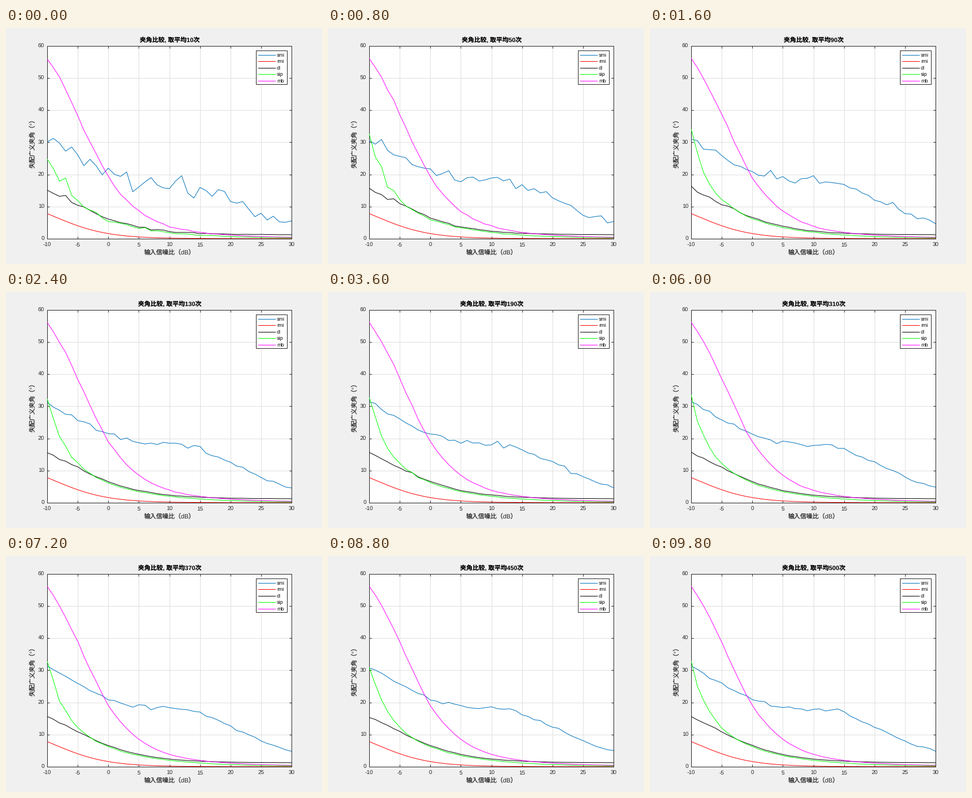
These frames come from a looping animation (560 by 420 pixels, 10000 ms). A matplotlib script:

```python
import numpy as np
import matplotlib.pyplot as plt
from matplotlib.animation import FuncAnimation
from matplotlib.patches import Rectangle

W, H, DPI = 560, 420, 100
PX = 72 / DPI                       # one pixel in points
LEFT, BOTTOM, AX_W, AX_H = 73.1, 45.1, 433, 343
INK = "#262626"
plt.rcParams.update({
    "font.family": ["Liberation Sans", "Noto Sans CJK JP"],
    "text.hinting": "none",
})

COLORS = {"smi": "#0072bd", "rmi": "#ff0000", "dl": "#000000",
          "sip": "#00ff00", "mb": "#ff00ff"}

snr = np.arange(-10, 31)


def bump(center, width):
    return np.exp(-((snr - center) / width) ** 2)


def falloff(top, b, rate):
    """Logistic decay with rising SNR."""
    return top / (1 + b * np.exp(rate * snr))


# Expected angle of each method, and the scatter of a single trial
tail = np.maximum(snr, 0) / 8
MEAN = {
    "smi": np.interp(snr, [-10, -4, 0, 4, 7, 11, 14, 20, 26, 30],
                     [31.2, 24.7, 21.1, 19.1, 18.4, 18.2, 17.4, 12.5, 7.1, 4.8]),
    "rmi": 1.783 / (0.1286 + 10 ** (snr / 10)),
    "dl": 1.2 + falloff(22.1, 3.1, 0.175),
    "sip": 6 * np.exp(-0.111 * snr) + 14.2 * np.exp(-0.42 * (snr + 10)),
    "mb": falloff(69.7, 2.667, 0.24) + 1.6 * tail * np.exp(1 - tail),
}
SPREAD = {
    "smi": 4.5 + 3.5 * bump(10, 8),
    "rmi": 0 * snr,
    "dl": 0.2 * MEAN["dl"] * np.where(snr > 15, 0.4, 1),
    "sip": 0.2 * MEAN["sip"] + 8 * bump(-10, 2),
    "mb": 2.8 * bump(-4, 5) + 0.7 * bump(8, 6),
}


def average(n):
    """All five curves after averaging n trials."""
    rng = np.random.default_rng(n)
    shared = rng.standard_normal(snr.size)
    curves = {}
    for name, mean in MEAN.items():
        z = rng.standard_normal(snr.size)
        if name in ("dl", "sip"):   # these two see the same data
            z = 0.8 * shared + 0.6 * z
        curves[name] = np.maximum(mean + SPREAD[name] * z / np.sqrt(n), 0)
    return curves


fig = plt.figure(figsize=(W / DPI, H / DPI), dpi=DPI, facecolor="#f0f0f0")
ax = fig.add_axes([LEFT / W, BOTTOM / H, AX_W / W, AX_H / H])
ax.set(xlim=(-10, 30), ylim=(0, 60),
       xticks=range(-10, 31, 5), yticks=range(0, 61, 10))
ax.set_axisbelow(True)
ax.grid(color="#dfdfdf", lw=PX)
ax.tick_params(direction="in", length=4.3 * PX, width=PX, color=INK,
               top=True, right=True, labelbottom=False, labelleft=False)
for spine in ax.spines.values():
    spine.set(color=INK, linewidth=PX, zorder=1.5)


def put(x, y, s, size, color=INK, **kw):
    """Text with its baseline at pixel (x, y), y counted from the top."""
    return fig.text(x / W, 1 - y / H, s, fontsize=size * PX, color=color,
                    va="baseline", **kw)


for v in range(-10, 31, 5):
    put(LEFT + (v + 10) * AX_W / 40, 388.7, str(v), 10, ha="center")
for v in range(0, 61, 10):
    put(68, 378 - v * AX_H / 60, str(v), 10, ha="right")

title = put(290, 25.5, "", 11, "black", ha="center", weight="bold")
put(244.5, 403, "输入信噪比（dB）", 11, ha="left")
put(51, 249, "失配广义夹角（°）", 11, ha="left", rotation=90,
    rotation_mode="anchor")

lines = {name: ax.plot([], [], color=c, lw=PX, zorder=3)[0]
         for name, c in COLORS.items()}

# Legend
fig.add_artist(Rectangle((443.1 / W, 1 - 99.9 / H), 55 / W, 60 / H,
                         fc="white", ec=INK, lw=PX, zorder=5))
for i, (name, c) in enumerate(COLORS.items()):
    y = 47.9 + 11.5 * i
    fig.add_artist(plt.Line2D([447 / W, 477 / W], [1 - y / H] * 2,
                              color=c, lw=PX, zorder=6))
    put(480, y + 2.9, name, 9, "black", ha="left", zorder=6)


def draw(frame):
    n = 10 * (frame + 1)
    title.set_text(f"夹角比较, 取平均{n}次")
    for name, y in average(n).items():
        lines[name].set_data(snr, y)
    return [title, *lines.values()]


anim = FuncAnimation(fig, draw, frames=50, interval=200, repeat=True,
                     repeat_delay=0, blit=False)
plt.show()
```
